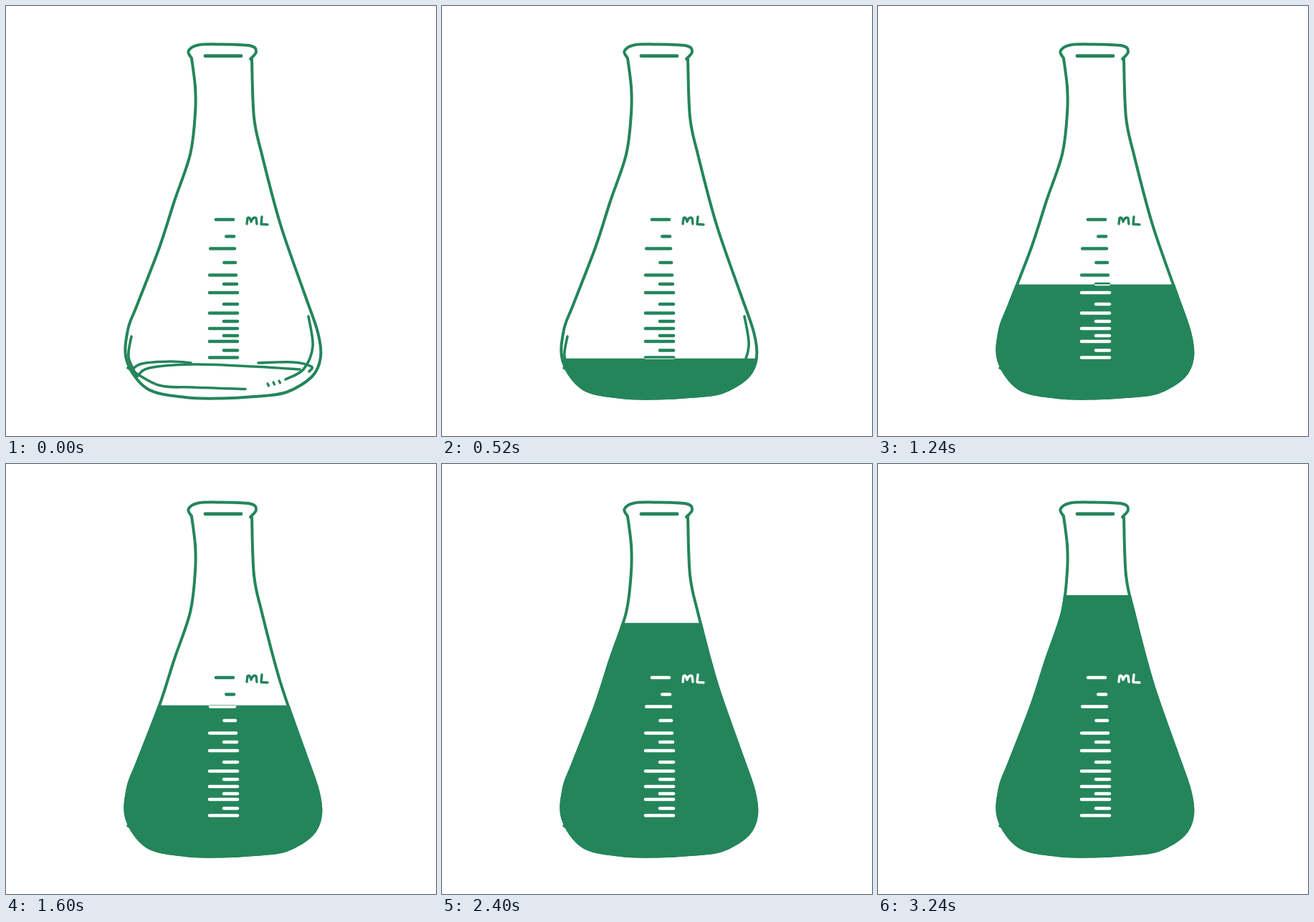
Animation, 600 px wide and 600 px high, one loop 3.6 s. Source, as an HTML page with a canvas:

```html
<!DOCTYPE html>
<html lang="en">
<head>
<meta charset="utf-8">
<title>Filling flask</title>
<style>
html, body { margin: 0; width: 100%; height: 100%; overflow: hidden; background: #fff; }
canvas { display: block; width: 600px; height: 600px; }
</style>
</head>
<body>
<canvas id="stage" width="600" height="600"></canvas>
<script>
const ctx = document.getElementById('stage').getContext('2d');
const GREEN = '#24855b';
const LOOP = 3600, STEP = 40;

// Smooth curve through a few x, y pairs
function curve(...p) {
  const path = new Path2D();
  const n = p.length / 2;
  const at = i => {
    const k = Math.max(0, Math.min(n - 1, i)) * 2;
    return [p[k], p[k + 1]];
  };
  path.moveTo(p[0], p[1]);
  for (let i = 0; i < n - 1; i++) {
    const [a, b, c, d] = [at(i - 1), at(i), at(i + 1), at(i + 2)];
    path.bezierCurveTo(
      b[0] + (c[0] - a[0]) / 6, b[1] + (c[1] - a[1]) / 6,
      c[0] - (d[0] - b[0]) / 6, c[1] - (d[1] - b[1]) / 6,
      c[0], c[1]);
  }
  return path;
}

const body = curve(
  259, 73, 264, 113, 264, 150, 257, 207, 235, 272, 214, 337, 183, 417, 170, 452,
  168.5, 495, 197, 534, 250, 546, 300, 547.5, 346, 545, 391, 539, 427, 517,
  439, 490, 435, 455, 416, 400, 383, 305, 357, 207, 346, 155, 343, 74);

const rim = curve(259, 73, 254.5, 63, 268, 54.5, 300, 53.5, 341, 55.5, 349, 64, 341, 74);

const glass = [
  curve(422, 433, 428, 475, 415, 507, 390, 521),
  curve(175, 461, 171, 490, 183, 517),
  curve(352, 498, 400, 497, 426, 503, 423, 510),
  curve(175, 508, 190, 499, 230, 496, 258, 498),
  curve(184, 516, 200, 505, 262, 500, 345, 503, 410, 507),
  curve(170, 505, 213, 529, 260, 532, 334, 534.5)
];

const markHeights = [298, 321.5, 338.5, 358, 375.5, 388, 400, 416,
  428.5, 440, 450, 460, 468, 480.5, 490.5];

const unit = new Path2D(
  'M336 304L337 296Q340 293 342 301Q345 293 349 296L350 304M357 294L356 304.5L365 305');

function stroke(path, width) {
  ctx.lineWidth = width;
  ctx.stroke(path);
}

function line(x0, y0, x1, y1, width) {
  ctx.lineWidth = width;
  ctx.beginPath();
  ctx.moveTo(x0, y0);
  ctx.lineTo(x1, y1);
  ctx.stroke();
}

// Long and short marks alternate; the topmost are shorter
function drawScale(color) {
  ctx.strokeStyle = color;
  markHeights.forEach((y, i) => {
    const left = (i % 2 ? 304 : 284) + 9 * Math.exp(-i);
    line(left, y, Math.min(323, 317 + i), y, 4.6);
  });
  stroke(unit, 3.4);
}

function drawFlask(level) {
  ctx.strokeStyle = ctx.fillStyle = GREEN;
  stroke(body, 4);
  stroke(rim, 4);
  line(278, 69.7, 328, 69.7, 4.8);
  glass.forEach(path => stroke(path, 3.6));
  for (let i = 0; i < 3; i++) line(365 + 8 * i, 527 - 2 * i, 366.5 + 8 * i, 530 - 2 * i, 3.2);
  drawScale(GREEN);

  ctx.save();
  ctx.beginPath();
  ctx.rect(0, level, 600, 700 - level);
  ctx.clip();
  ctx.fill(body);
  stroke(body, 4);
  drawScale('#fff');
  ctx.restore();
}

// Four strokes, 45 degrees apart, covering the span from..to of their length
function burst(x, y, angle, length, from, to) {
  for (let i = 0; i < 4; i++) {
    const a = (angle + 45 * i) * Math.PI / 180;
    const r0 = 13 + length * from, r1 = 13 + length * to;
    line(x + r0 * Math.cos(a), y + r0 * Math.sin(a),
      x + r1 * Math.cos(a), y + r1 * Math.sin(a), 5);
  }
}

function drawSparks(t) {
  if (t < 2680 || t >= 3240) return;
  const from = Math.max(0, (t - 2840) / 400);
  const to = Math.min(1, (t - 2640) / 200);
  ctx.strokeStyle = GREEN;
  burst(266, 178, 194, 16, from, to);
  burst(348, 182, 245, 4, from, to);
}

const levelAt = t => Math.max(183, 566.5 - 0.1436 * t);

// Two rocks to the right, each 260 ms
function rock(t) {
  const u = t / 260;
  return u <= 0 || u >= 2 ? 0 : 0.034 * (1 - Math.cos(2 * Math.PI * u));
}

function draw(now) {
  const t = Math.floor(now % LOOP / STEP) * STEP;
  ctx.fillStyle = '#fff';
  ctx.fillRect(0, 0, 600, 600);
  ctx.lineCap = ctx.lineJoin = 'round';
  ctx.save();
  ctx.translate(300, 300);
  ctx.rotate(rock(t) + rock(t - 2580));
  ctx.translate(-300, -300);
  drawFlask(levelAt(t));
  ctx.restore();
  drawSparks(t);
}

let start;
function tick(now) {
  if (start === undefined) start = now;
  draw(Math.max(0, now - start));
  requestAnimationFrame(tick);
}
draw(0);
requestAnimationFrame(tick);
</script>
</body>
</html>
```
